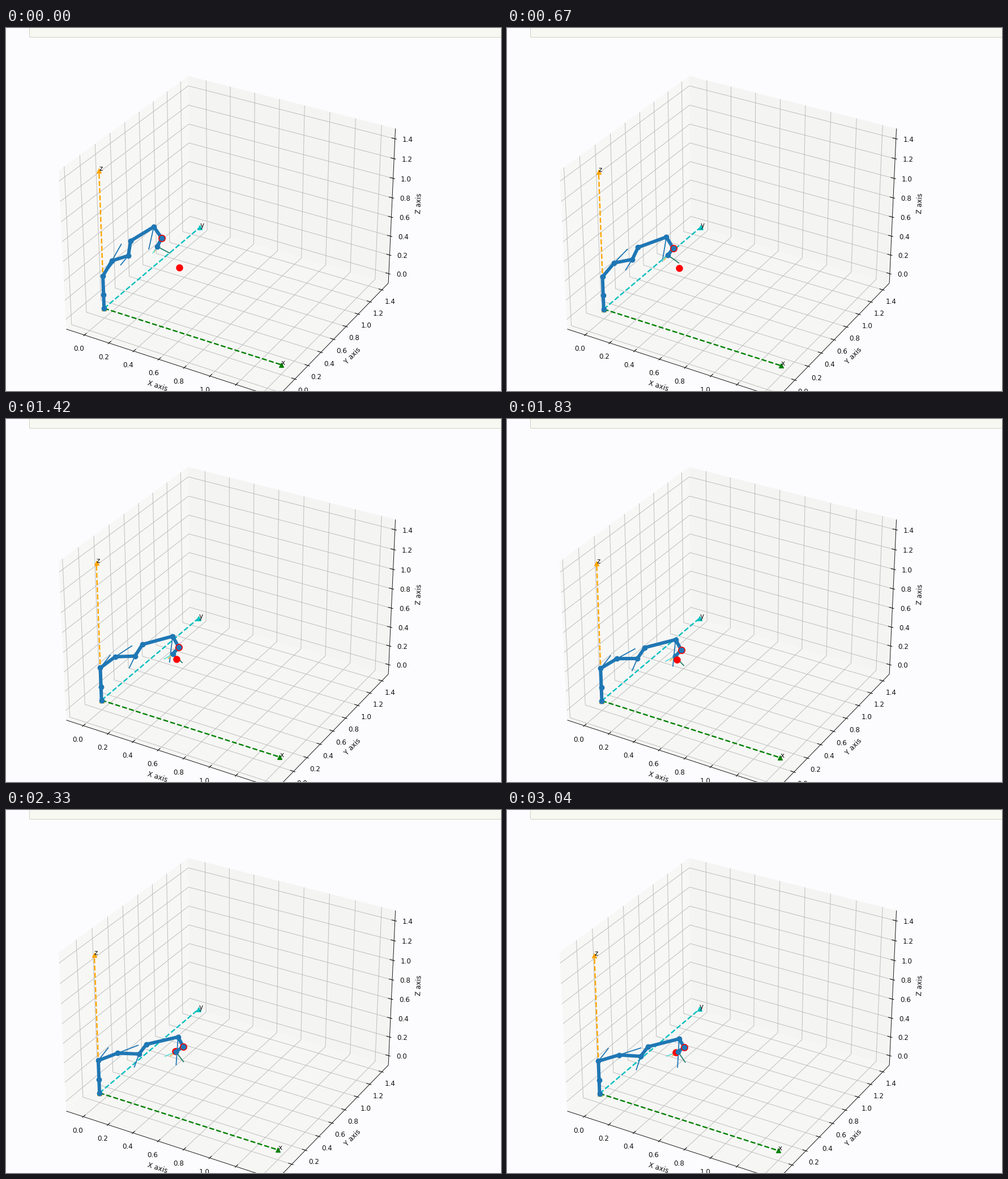
Recreate the animation shown at these times as a matplotlib script. Size 874 px wide and 641 px high, loop 3.08 s.

```python
import numpy as np
import matplotlib.pyplot as plt
from matplotlib.animation import FuncAnimation
from matplotlib.collections import LineCollection
from matplotlib.patches import FancyBboxPatch, Polygon

W, H, DPI = 874, 641, 128
PX = 72 / DPI                      # one pixel in points
STEP, LOOP = 40, 3080

plt.rcParams["font.family"] = "DejaVu Sans"
fig = plt.figure(figsize=(W / DPI, H / DPI), dpi=DPI, facecolor="#fcfcfe")
ax = fig.add_axes([0, 0, 1, 1])
ax.set_xlim(0, W)
ax.set_ylim(H, 0)
ax.axis("off")

# Perspective camera: elevation 30, azimuth -60, box 4:4:3, distance 10
BOX = np.array([8 / 7, 8 / 7, 6 / 7])
EL, AZ = np.radians(30), np.radians(-60)
VIEW = np.array([np.cos(EL) * np.cos(AZ), np.cos(EL) * np.sin(AZ), np.sin(EL)])
RIGHT = np.array([-np.sin(AZ), np.cos(AZ), 0])
UP = np.cross(VIEW, RIGHT)
LO, HI = -1 / 48, 1 + 1 / 48       # pane edges in unit-cube coordinates
TOP = 21 / 22                      # where the value 1.4 sits on each axis
Z0 = 1 / 22                        # where z = 0 sits


def proj(*u):
    q = (np.array(u, float) - 0.5) * BOX
    k = 3574 / (10 - q @ VIEW)
    return np.array([396 + k * (q @ RIGHT), 355.2 - k * (q @ UP)])


def unit(v, zero):
    """Value on an axis -> unit cube, given where zero sits."""
    return zero + v / 1.4 * (TOP - zero)


# Cell border above the plot
ax.add_patch(FancyBboxPatch((43.5, -20), 900, 34.5, boxstyle="round,pad=2",
                            fc="#f8f8f2", ec="#d0d0c6", lw=PX))

# Panes
PANES = [("#f7f7f6", [(LO, LO, LO), (LO, HI, LO), (LO, HI, HI), (LO, LO, HI)]),
         ("#f4f4f3", [(LO, HI, LO), (HI, HI, LO), (HI, HI, HI), (LO, HI, HI)]),
         ("#f6f6f5", [(LO, LO, LO), (HI, LO, LO), (HI, HI, LO), (LO, HI, LO)])]
for color, corners in PANES:
    ax.add_patch(Polygon([proj(*c) for c in corners], fc=color, ec="none"))

grid = ax.add_collection(LineCollection([], colors="#bcbcbc",
                                        linewidths=0.95 * PX, zorder=2))
ticks = ax.add_collection(LineCollection([], colors="#111111",
                                         linewidths=1.1 * PX, zorder=3))
EDGES = [[proj(LO, LO, LO), proj(HI, LO, LO)],
         [proj(HI, LO, LO), proj(HI, HI, LO)],
         [proj(HI, HI, LO), proj(HI, HI, HI)]]
ax.add_collection(LineCollection(EDGES, colors="#111111",
                                 linewidths=0.95 * PX, zorder=3))


def text(s, x=0, y=0, z=4, **kw):
    kw = {"ha": "center", "va": "center", **kw}
    return ax.text(x, y, s, fontsize=11.95 * PX, color="#111111", zorder=z, **kw)


text("X axis", 267, 632.5, rotation=-18)
text("Y axis", 612, 579, rotation=45.7)
text("Z axis", 729, 310, rotation=87.5)

VALUES = np.arange(8) * 0.2
labels = [[text(f"{v:.1f}") for v in VALUES] for _ in range(3)]
OFFSETS = [(-9.5, 24.8), (14.5, 20.8), (22.8, 1.7)]

# World axes: dashed lines with a triangle at both ends
rods, names = [], []
for name, color in zip("xyz", ["green", "#00bfbf", "orange"]):
    rods += ax.plot([], [], "--^", color=color, lw=2.4 * PX, ms=7.2 * PX,
                    mew=1.2 * PX, zorder=5)
    names.append(text(name, z=15, ha="left", va="baseline"))

# Robot arm
BLUE = "#1f77b4"


def dots(color, size, z):
    return ax.plot([], [], "o", color=color, ms=size * PX, mew=0, zorder=z)[0]


goal = dots("red", 12.5, 13)
ring = dots("red", 13, 10)
arm, = ax.plot([], [], color=BLUE, lw=6 * PX, zorder=9,
               solid_joinstyle="round", solid_capstyle="projecting")
joints = dots(BLUE, 9.8, 12)

# Poses along the move: pixel paths of the joints beyond the shoulder
KEYS = [0, 0.32, 0.6, 0.91, 1]
JOINTS = [
    ([187, 189.5, 193, 197, 198], [411, 415, 420, 429.5, 432.5]),
    ([216, 221.5, 228, 235, 236], [402, 409, 419, 431, 435]),
    ([220, 232, 241, 248, 249], [376, 388, 398.5, 414, 418]),
    ([261, 282.5, 294.5, 304, 304], [351, 370, 384, 401, 404]),
    ([275, 294.5, 305.5, 313, 313], [371, 390, 403.5, 418, 419]),
    ([267, 285, 295, 300, 302], [386, 402, 415, 427, 427]),
]
GOAL = ([306, 303.5, 301, 299, 297.5], [423, 424, 424, 426.5, 427.5])
X_ZERO = [0.0735, 0.0719, 0.0676, 0.0677, 0.067]
Y_ZERO = [0.1372, 0.1282, 0.1256, 0.1096, 0.1037]

# Joint axes: arm point, first and last offset, colour
STICKS = [(2, (18, -23), (18, -23), BLUE),
          (3, (17, -30), (39, -12.5), BLUE),
          (4, (-14, 17), (-8, 24.5), BLUE),
          (6, (-9, 40), (-3, 51), BLUE),
          (8, (-5, 10), (-11, 8), "#ffb84d"),
          (8, (-8, 12), (-21, 8), "#5fdcd8"),
          (8, (23, 12), (13, 19), "#1f7f6a")]
sticks = ax.add_collection(LineCollection(
    [], colors=[s[3] for s in STICKS], linewidths=1.8 * PX, zorder=8))


def progress(t):
    return np.interp(t, [80, 670, 1040, 1420, 1830, 2330, 3040],
                     [0, 0.32, 0.44, 0.6, 0.71, 0.91, 1])


def path(p, xy):
    return np.array([np.interp(p, KEYS, c) for c in xy])


def draw_axes(zeros):
    lines, marks = [], []
    out, inn = 0.1 / 12, -0.2 / 12
    for axis in range(3):
        for i, v in enumerate(np.append(VALUES, -0.2)):
            u = unit(v, zeros[axis])
            if u < 0:
                continue
            if axis == 0:
                wall = [(u, LO, LO), (u, HI, LO), (u, HI, HI)]
                mark = [(u, LO - out, LO), (u, LO - inn, LO)]
                spot = (u, LO, LO)
            elif axis == 1:
                wall = [(HI, u, LO), (LO, u, LO), (LO, u, HI)]
                mark = [(HI + out, u, LO), (HI + inn, u, LO)]
                spot = (HI, u, LO)
            else:
                wall = [(LO, LO, u), (LO, HI, u), (HI, HI, u)]
                mark = [(HI + out, HI, u), (HI + inn, HI, u)]
                spot = (HI, HI, u)
            lines.append([proj(*c) for c in wall])
            marks.append([proj(*c) for c in mark])
            if i < len(VALUES):
                labels[axis][i].set_position(proj(*spot) + OFFSETS[axis])
    grid.set_segments(lines)
    ticks.set_segments(marks)


def update(n):
    p = progress(n * STEP)
    zeros = np.array([np.interp(p, KEYS, X_ZERO), np.interp(p, KEYS, Y_ZERO), Z0])
    draw_axes(zeros)

    base = proj(*zeros)
    for axis in range(3):
        end = zeros.copy()
        end[axis] = TOP
        tip = proj(*end)
        rods[axis].set_data(*zip(base, tip))
        names[axis].set_position(tip)

    column = [proj(zeros[0], zeros[1], unit(z, Z0)) for z in (0, 0.1435, 0.3395)]
    pts = np.array(column + [path(p, j) for j in JOINTS])
    arm.set_data(*pts.T)
    joints.set_data(*pts.T)
    ring.set_data(*pts[7:8].T)
    goal.set_data(*path(p, GOAL).reshape(2, 1))
    goal.set_zorder(13 if p < 0.8 else 8.5)
    sticks.set_segments([
        [pts[i], pts[i] + (1 - p) * np.array(a) + p * np.array(b)]
        for i, a, b, _ in STICKS])
    return []


anim = FuncAnimation(fig, update, frames=LOOP // STEP, interval=STEP,
                     repeat=True, repeat_delay=0, blit=False)
plt.show()
```
